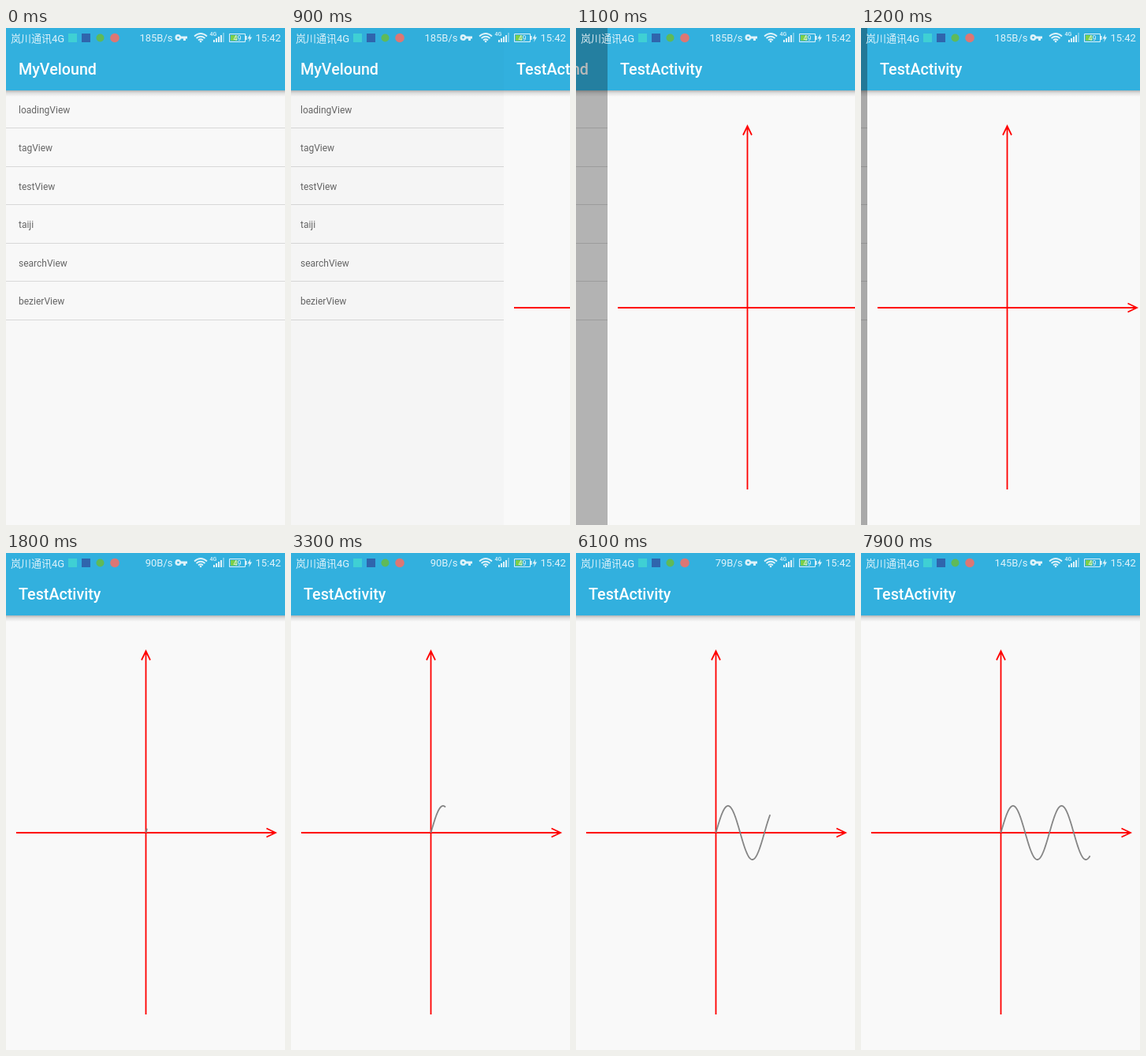
Write an HTML page that moves like this. It is 354 px wide and 629 px high and loops after 8 s.

```html
<!DOCTYPE html>
<html lang="en">
<head>
<meta charset="utf-8">
<title>Sine view</title>
<style>
html, body { margin: 0; width: 100%; height: 100%; overflow: hidden; background: #f8f8f8; }
svg { display: block; width: 100%; height: 100%; font-family: Roboto, "Noto Sans CJK SC", "Noto Sans CJK", sans-serif; }
.title { font-size: 19.7px; font-weight: 500; fill: #fff; }
.row { font-size: 12px; fill: #656565; }
.bar { font-size: 13px; fill: #fff; opacity: .84; }
.line { fill: none; stroke-width: 1.8; }
</style>
</head>
<body>
<svg viewBox="0 0 354 629">
  <defs>
    <linearGradient id="shade" x2="0" y2="1">
      <stop offset="0" stop-opacity=".27"/>
      <stop offset=".4" stop-opacity=".1"/>
      <stop offset="1" stop-opacity="0"/>
    </linearGradient>
    <g id="header">
      <path fill="#32b0de" d="M0 0H354V79H0z"/>
      <path fill="url(#shade)" d="M0 79H354V87H0z"/>
    </g>
  </defs>

  <g id="list">
    <path fill="#f8f8f8" d="M0 0H354V629H0z"/>
    <use href="#header"/>
    <text class="title" x="16" y="59">MyVelound</text>
    <g id="rows"></g>
  </g>
  <path id="dim" d="M0 0H354V629H0z" opacity="0"/>

  <g id="page" transform="translate(354)">
    <path fill="#f9f9f9" d="M0 0H354V629H0z"/>
    <use href="#header"/>
    <text class="title" x="16" y="59">TestActivity</text>
    <path class="line" stroke="#f00" d="M177.5 584V124M172 135.5L177.5 124L183 135.5M13 354H342M330.500 348.500L342 354L330.500 359.500"/>
    <path id="wave" class="line" stroke="#858585"/>
  </g>

  <g class="bar">
    <text x="6" y="17.500">岚川通讯4G</text>
    <text id="speed" x="211.500" y="17.300" text-anchor="end"></text>
    <text x="316.500" y="17.300">15:42</text>
    <text x="258.500" y="9.500" font-size="7" font-weight="500">4G</text>
    <path fill-rule="evenodd" d="M218.500 8a4 4 0 1 0 3.700 5.500H225V16H228V13.500H230V10.500H222.200A4 4 0 0 0 218.500 8zm0 2.700a1.400 1.400 0 1 1 0 2.800a1.400 1.400 0 0 1 0-2.800z"/>
    <path fill="none" stroke="#fff" stroke-width="1.700" d="M239 10.500Q247 3.500 255 10.500M241.500 13Q247 8.500 252.500 13M244 15.500Q247 13 250 15.500"/>
    <circle cx="247" cy="17" r="1.300"/>
    <path d="M263 15h2v3h-2zM266 13h2v5h-2zM269 11h2v7h-2zM272 9h2v9h-2z"/>
    <path opacity=".4" d="M275 6h2v12h-2z"/>
    <path fill="none" stroke="#fff" d="M283.500 7.500H303.500V17.500H283.500z"/>
    <path d="M304 10h1.500v5h-1.500z"/>
    <path fill="#8bd52c" d="M285 9h8.500v7h-8.500z"/>
    <text x="293.500" y="16" font-size="9" text-anchor="middle">49</text>
    <path d="M310 7.500L306.500 13.500H309L308 18L312 11.500H309.500z"/>
  </g>
  <path fill="#3fd0d4" d="M79 7h11v11h-11z"/>
  <path fill="#2f65ad" d="M96 7h11v11h-11z"/>
  <circle cx="119.500" cy="12.500" r="5" fill="#5fba58"/>
  <circle cx="138" cy="12.500" r="5.800" fill="#dc7774"/>
</svg>
<script>
const $ = id => document.getElementById(id);
const LOOP = 8000, STEP = 100;

// [time, value] points, joined by straight lines
const enter = [[800, 354], [900, 270], [1000, 141], [1100, 40], [1200, 8], [1300, 0]];
const leave = [[800, 0], [900, 4], [1000, 26], [1100, 99], [1200, 115], [1300, 118]];
const tip = [[1600, 177.5], [1800, 179], [2300, 182], [3200, 193.5], [3300, 196], [5000, 226],
  [5900, 243], [6100, 246.3], [6800, 266], [7700, 282.5], [7900, 290.5]];
const speeds = [[0, "185B/s"], [1600, "90B/s"], [4600, "79B/s"], [7600, "145B/s"]];

function at(points, t) {
  const i = points.findIndex(p => p[0] >= t);
  if (i < 0) return points[points.length - 1][1];
  if (i === 0) return points[0][1];
  const [t0, a] = points[i - 1], [t1, b] = points[i];
  return a + (b - a) * (t - t0) / (t1 - t0);
}

const waveY = x => 354 - 34 * Math.sin((x - 177.5) / 61.6 * 2 * Math.PI);

function wavePath(end) {
  if (end <= 177.5) return "";
  let d = "M177.5 354";
  for (let x = 178; x < end; x += 0.5) d += `L${x} ${waveY(x).toFixed(2)}`;
  return d + `L${end} ${waveY(end)}`;
}

$("rows").innerHTML = ["loadingView", "tagView", "testView", "taiji", "searchView", "bezierView"]
  .map((name, i) => {
    const y = 48.5 * i;
    return `<text class="row" x="16" y="${107.7 + y}">${name}</text>
      <path fill="#d8d8d8" d="M0 ${Math.floor(126.5 + y)}h354v1h-354z"/>`;
  }).join("");

function draw(now) {
  const t = Math.floor(now % LOOP / STEP) * STEP;
  const shift = at(leave, t);
  $("list").setAttribute("transform", `translate(${-shift})`);
  $("dim").setAttribute("opacity", shift * 0.0028);
  $("page").setAttribute("transform", `translate(${at(enter, t)})`);
  $("wave").setAttribute("d", wavePath(at(tip, t)));
  $("speed").textContent = speeds.filter(s => s[0] <= t).pop()[1];
}

const start = performance.now();
function tick() {
  draw(performance.now() - start);
  requestAnimationFrame(tick);
}
tick();
</script>
</body>
</html>
```
